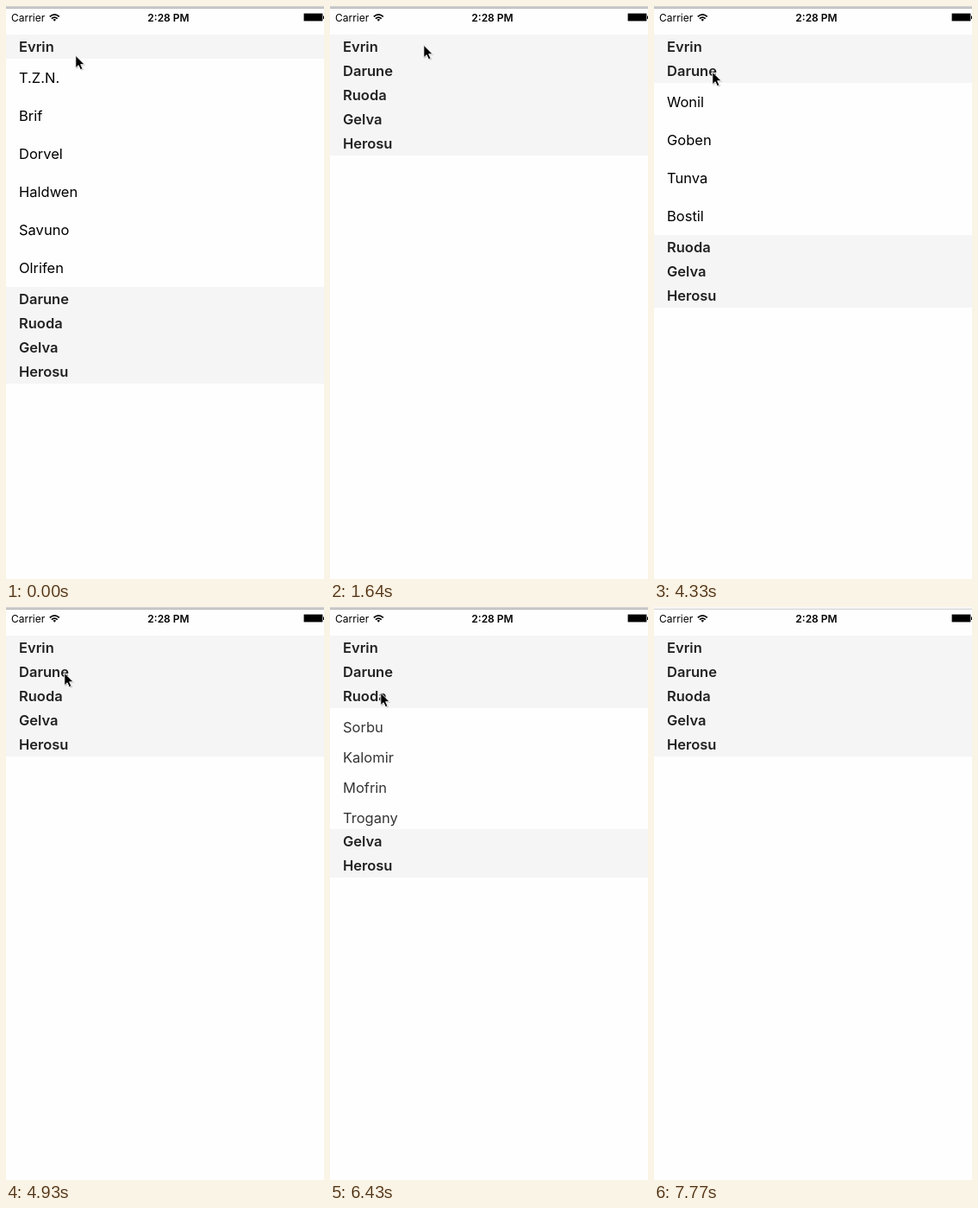
An HTML page that plays this animation: 369x663 px, repeating every 7.87 s.

```html
<!DOCTYPE html>
<html lang="en">
<head>
<meta charset="utf-8">
<style>
  html, body { margin: 0; width: 100%; height: 100%; overflow: hidden; background: #fefefe; }
  svg { display: block; width: 369px; height: 663px; font: 16.5px Inter, "Open Sans", sans-serif; }
  .header { font-weight: 600; fill: #222; }
  .status { font-size: 12px; }
</style>
</head>
<body>
<svg viewBox="0 0 369 663">
  <rect id="titlebar" width="369" height="2"/>
  <rect id="border" y="2" width="369" height="1"/>
  <g class="status">
    <text x="6" y="17.7">Carrier</text>
    <text x="188.5" y="17.7" text-anchor="middle" font-weight="600">2:28 PM</text>
    <g fill="none" stroke="#000" stroke-width="1.7">
      <path d="M50.8 12.3Q56.3 7.3 61.8 12.3M52.9 14.6Q56.3 11.6 59.7 14.6"/>
      <path d="M54.5 15.8Q56.3 14.3 58.1 15.8L56.3 17.7Z" fill="#000" stroke="none"/>
    </g>
    <rect x="345.5" y="8.5" width="22" height="9" rx="1.2" stroke="#999"/>
    <path d="M368 11.5h1v3.5h-1z"/>
  </g>
  <g id="list"></g>
  <g id="cursor">
    <g transform="translate(.8 .3) scale(.9)">
      <path d="M1 1.5V17.5L5 14L7.5 19.5L10.5 18.2L8 12.8H13Z" opacity=".2"/>
      <path d="M0 0V16L3.7 12.6L6.2 18.2L9 17L6.5 11.5H11.5Z" stroke="#fff"/>
    </g>
  </g>
</svg>
<script>
const LOOP = 7870, TICK = 149.3, TOP = 33, HEADER = 28, ROW = 44, EXPAND = 300;

// Opening and closing times are in ms.
const sections = [
  { title: "Evrin", rows: ["T.Z.N.", "Brif", "Dorvel", "Haldwen", "Savuno", "Olrifen"],
    opens: -EXPAND, closes: 975, ruledUntil: 1340 },
  { title: "Darune", rows: ["Wonil", "Goben", "Tunva", "Bostil"], opens: 2480, closes: 4560 },
  { title: "Ruoda", rows: ["Sorbu", "Kalomir", "Mofrin", "Trogany"],
    opens: 5370, closes: 6332, ruledUntil: 6000 },
  { title: "Gelva", rows: [] },
  { title: "Herosu", rows: [] }
];

// Each glide runs between two ticks and ends at a point.
const cursorStart = { x: 80, y: 57 };
const glides = [
  { from: 3, until: 5, x: 108, y: 45 },
  { from: 11, until: 13, x: 91, y: 73 },
  { from: 14, until: 16, x: 88, y: 81 },
  { from: 28, until: 29, x: 67, y: 76 },
  { from: 33, until: 36, x: 58, y: 99 },
  { from: 43, until: 46, x: 324, y: 487 },
  { from: 46, until: 49, x: 348, y: 629 }
];
const CURSOR_GONE = 50, WINDOW_INACTIVE = 52;

const byId = id => document.getElementById(id);
const progress = (now, from, until) => Math.min(1, Math.max(0, (now - from) / (until - from)));

function expansion(time, start) {
  const p = progress(time, start, start + EXPAND);
  return p * p * (3 - 2 * p);
}

function cursorAt(tick) {
  let { x, y } = cursorStart;
  for (const glide of glides) {
    const p = progress(tick, glide.from, glide.until);
    x += (glide.x - x) * p;
    y += (glide.y - y) * p;
  }
  return [x, y];
}

function drawRows(section, top, open, time) {
  const ruled = open < 1 && time < section.ruledUntil;
  return section.rows.map((name, i) => {
    const y = top + i * ROW * open;
    const rule = ruled && i > 0 && i < section.rows.length - 1
      ? `<path d="M15 ${Math.round(y + 43) + .5}H369" stroke="#c8c7cc"/>` : "";
    return `<text x="15" y="${y + 28}" opacity="${open}">${name}</text>${rule}`;
  }).join("");
}

function drawList(time) {
  let y = TOP, rows = "", headers = "";
  for (const section of sections) {
    headers += `<rect y="${y}" width="369" height="${HEADER}" fill="#f5f5f5"/>
      <text class="header" x="15" y="${y + 20}">${section.title}</text>`;
    y += HEADER;
    const open = section.rows.length ? expansion(time, section.opens) - expansion(time, section.closes) : 0;
    if (open > 0) {
      rows += drawRows(section, y, open, time);
      y += Math.round(section.rows.length * ROW * open);
    }
  }
  return rows + headers;
}

let shown = -1;
function frame(now) {
  // The small offset absorbs rounding of the tick length.
  const tick = Math.floor(now % LOOP / TICK + .08);
  if (tick !== shown) {
    shown = tick;
    const active = tick < WINDOW_INACTIVE;
    byId("list").innerHTML = drawList(tick * TICK);
    byId("titlebar").setAttribute("fill", active ? "#d0d0d0" : "#f6f6f6");
    byId("border").setAttribute("fill", active ? "#b1b1b1" : "#d1d1d1");
    byId("cursor").setAttribute("transform", `translate(${cursorAt(tick)})`);
    byId("cursor").setAttribute("visibility", tick < CURSOR_GONE ? "visible" : "hidden");
  }
  requestAnimationFrame(() => frame(performance.now()));
}
frame(0);
</script>
</body>
</html>
```
